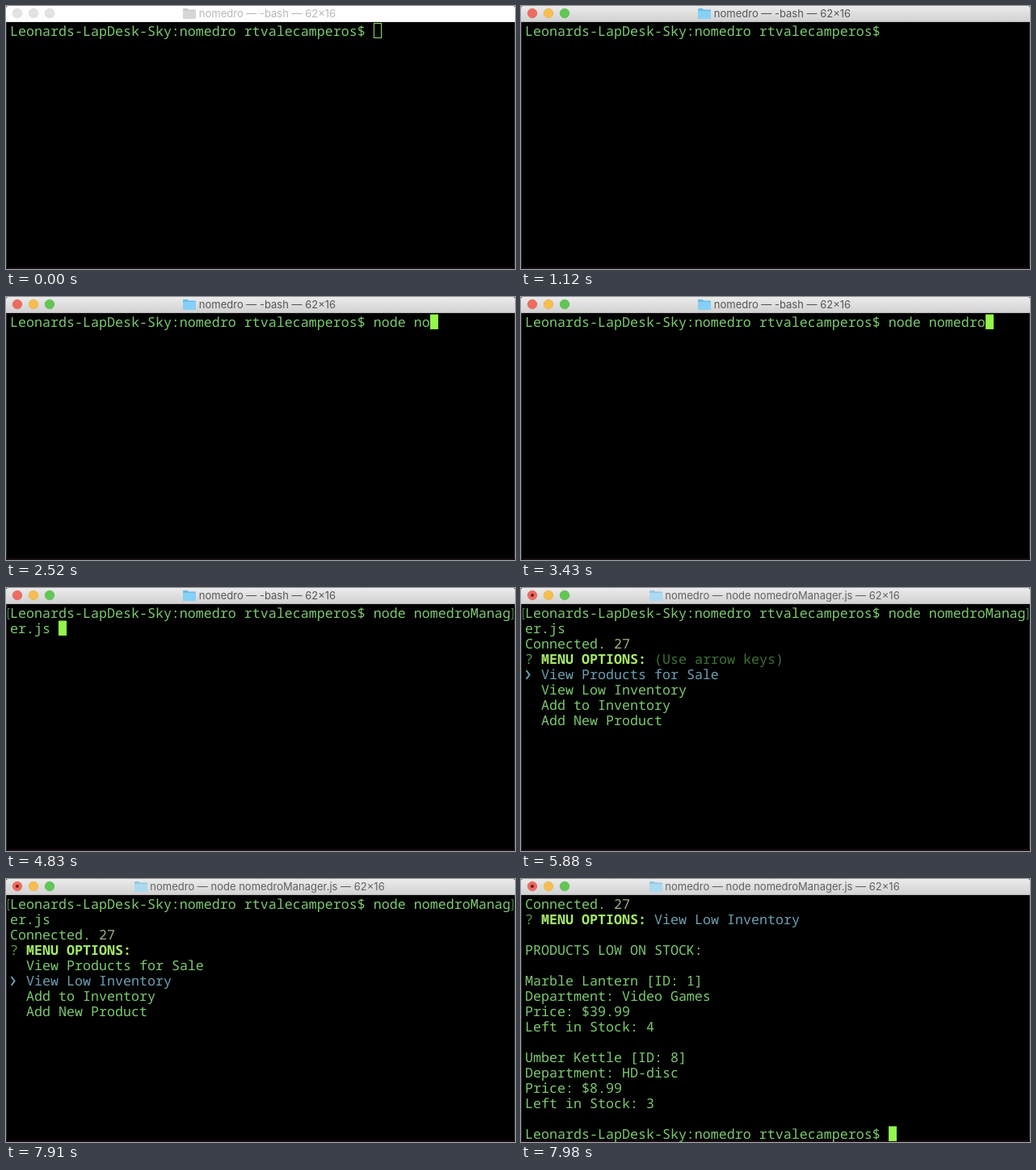
Write an HTML page that moves like this. It is 630 px wide and 326 px high and loops after 8000 ms.

```html
<!DOCTYPE html>
<html lang="en">
<head>
<meta charset="utf-8">
<title>Terminal session</title>
<style>
  html, body { margin: 0; width: 100%; height: 100%; overflow: hidden; background: #000; }
  svg { display: block; width: 630px; height: 326px; }
  .term text { font: 300 16.667px "Noto Sans Mono", monospace; white-space: pre; text-rendering: geometricPrecision; }
  .term .bold { font-weight: bold; }
  .title { font: 13px Inter, sans-serif; text-anchor: middle; }
</style>
</head>
<body>
<svg viewBox="0 0 630 326">
  <defs>
    <linearGradient id="bar" x2="0" y2="1">
      <stop offset="0" stop-color="#ebebeb"/>
      <stop offset="1" stop-color="#d1d1d1"/>
    </linearGradient>
  </defs>
  <rect width="630" height="326"/>
  <path d="M.5 20V326M629.5 20V326" stroke="#2c2f2c"/>
  <path d="M0 325H630" stroke="#190c12" stroke-width="2"/>
  <g id="head"></g>
  <g id="body" class="term"></g>
</svg>
<script>
const LOOP = 8000, COLS = 62, CELL = 10, ROW = 19, LEFT = 5;
const GREEN = '#7cc96f', BLOCK = '#93f84c', HOLLOW = '#8fdc74', BOLD = '#a6ec68', DIM = '#3d7036',
      CYAN = '#6c9fb3', NUMBER = '#9ab083', MARK = '#64905f';

const APP = 'nomedro';
const PROMPT = `Leonards-LapDesk-Sky:${APP} rtvalecamperos$ `;
const SCRIPT = `${APP}Manager.js`;
const COMMAND = `node ${SCRIPT} `;
const MENU = ['View Products for Sale', 'View Low Inventory', 'Add to Inventory', 'Add New Product'];
const REPORT = [
  'PRODUCTS LOW ON STOCK:', '',
  'Marble Lantern [ID: 1]', 'Department: Video Games', 'Price: $39.99', 'Left in Stock: 4', '',
  'Umber Kettle [ID: 8]', 'Department: HD-disc', 'Price: $8.99', 'Left in Stock: 3'
];

const KEYS = [1190, 1330, 1470, 1610, 1820, 2310, 2520, 2590, 2730, 2870, 3010, 3150, 3570];
const FOCUS = 350, PRESS = 1120, COMPLETE = 3850, ENTER = 5040, LAUNCH = 5110,
      ASK = 5390, DOWN = 7210, PICK = 7980;

// Window chrome: bar, edge, label, folder tab and front, light fills and rims.
const INACTIVE = {
  bar: '#fefefe', edge: '#e4e4e4', label: '#b8b8b8', folder: ['#cbcbcb', '#d6d6d6'],
  lights: ['#e2e2e2', '#e2e2e2', '#e2e2e2'], rims: ['#d6d6d6', '#d6d6d6', '#d6d6d6']
};
const ACTIVE = {
  bar: 'url(#bar)', edge: '#b4b4b4', label: '#565656', folder: ['#69bce8', '#86d0f7'],
  lights: ['#ed6b60', '#f5be4f', '#62c655'], rims: ['#dc5f53', '#e2ae43', '#55b548']
};
const RUNNING = { ...ACTIVE, label: '#626262', folder: ['#93c8e2', '#abd9ef'] };

const head = document.getElementById('head');
const body = document.getElementById('body');

const text = (row, col, str, fill = GREEN, cls = '') =>
  `<text x="${LEFT + col * CELL}" y="${37 + row * ROW}" fill="${fill}" class="${cls}">${str}</text>`;

const cursor = (row, col, hollow) => {
  const x = LEFT + col * CELL, y = 21.5 + row * ROW;
  return hollow
    ? `<rect x="${x + .5}" y="${y}" width="9" height="18" fill="none" stroke="${HOLLOW}"/>`
    : `<rect x="${x}" y="${y}" width="10" height="18.5" fill="${BLOCK}"/>`;
};

function titleBar(active, running) {
  const look = running ? RUNNING : active ? ACTIVE : INACTIVE;
  const fx = running ? 159 : 219;
  const name = running ? `node ${SCRIPT}` : '-bash';
  const light = (fill, i) =>
    `<circle cx="${14 + i * 20}" cy="9" r="5.8" fill="${fill}" stroke="${look.rims[i]}" stroke-width=".6"/>`;
  return `<path d="M0 20V2Q0 0 2 0H628Q630 0 630 2V20Z" fill="${look.bar}"/>` +
    `<path d="M0 19.5H630" stroke="${look.edge}"/>` +
    look.lights.map(light).join('') +
    (running ? '<circle cx="14" cy="9" r="2" fill="#6f1712"/>' : '') +
    `<path d="M${fx} 15V4q0-1 1-1h4.5l1.5 1.5h8q1 0 1 1V15q0 1-1 1h-14q-1 0-1-1z" fill="${look.folder[0]}"/>` +
    `<rect x="${fx}" y="6" width="16" height="10" rx="1" fill="${look.folder[1]}"/>` +
    `<text class="title" x="323.5" y="14" fill="${look.label}">${APP} — ${name} — 62×16</text>`;
}

function commandLine(t) {
  const done = t >= COMPLETE;
  const count = done ? COMMAND.length : KEYS.filter(k => t >= k).length;
  const line = PROMPT + COMMAND.slice(0, count);
  let out = text(0, 0, line.slice(0, COLS)) + text(1, 0, line.slice(COLS));
  if (done) {
    out += `<path d="M4.5 25.5H2.5V38.5H4.5M625.5 25.5H627.5V38.5H625.5" fill="none" stroke="${MARK}"/>`;
  }
  if (t < ENTER) {
    const erased = t >= PRESS && t < KEYS[0];
    if (!erased) out += cursor(Math.floor(line.length / COLS), line.length % COLS, t < FOCUS);
  } else if (t < ASK) {
    out += cursor(2, 0);
  }
  return out;
}

const connected = row => text(row, 0, 'Connected.') + text(row, 11, '27', NUMBER);

const question = row => text(row, 0, '?', '#5c994a') + text(row, 2, 'MENU OPTIONS:', BOLD, 'bold');

function menu(t) {
  const chosen = t < DOWN ? 0 : 1;
  const y = 102 + chosen * ROW;
  return connected(2) + question(3) +
    (t < DOWN ? text(3, 16, '(Use arrow keys)', DIM) : '') +
    MENU.map((item, i) => text(4 + i, 2, item, i === chosen ? CYAN : GREEN)).join('') +
    `<path d="M6.5 ${y}l4 5.5l-4 5.5" fill="none" stroke="${CYAN}" stroke-width="2"/>`;
}

const report = () => connected(0) + question(1) + text(1, 16, MENU[1], CYAN) +
  REPORT.map((line, i) => text(3 + i, 0, line)).join('') +
  text(15, 0, PROMPT) + cursor(15, PROMPT.length);

const STEPS = [0, FOCUS, PRESS, ...KEYS, COMPLETE, ENTER, LAUNCH, ASK, DOWN, PICK];
let shown = -1;

function render(t) {
  const step = STEPS.filter(s => t >= s).length;
  if (step === shown) return;
  shown = step;
  head.innerHTML = titleBar(t >= FOCUS, t >= LAUNCH);
  body.innerHTML = t >= PICK ? report() : commandLine(t) + (t >= ASK ? menu(t) : '');
}

const start = performance.now();
function tick() {
  render((performance.now() - start) % LOOP);
  requestAnimationFrame(tick);
}
tick();
</script>
</body>
</html>
```
